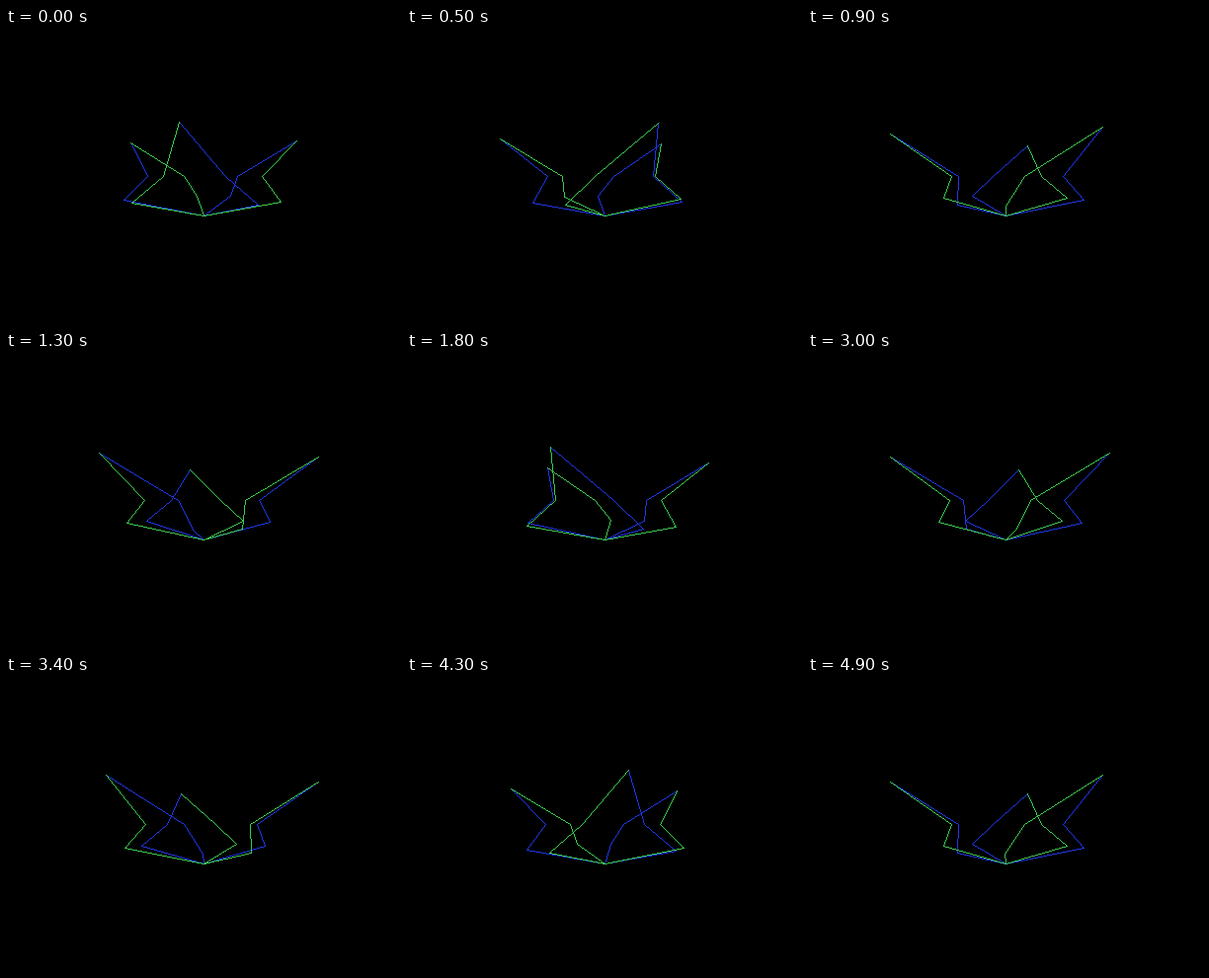
Recreate the animation shown at these times as an HTML page with a canvas. Size 400 px wide and 300 px high, loop 5000 ms.

```html
<!DOCTYPE html>
<html lang="en">
<head>
<meta charset="utf-8">
<title>Rotating wireframe</title>
<style>
  html, body { margin: 0; width: 100%; height: 100%; overflow: hidden; background: #000; }
  canvas { display: block; }
</style>
</head>
<body>
<canvas id="stage" width="400" height="300"></canvas>
<script>
const ctx = document.getElementById('stage').getContext('2d');
const STEP = 100, STEPS = 50;          // ms per step, steps per loop
const TURN = 6, START = -9;            // degrees
const FOCAL = 396.95, DIST = 10, CX = 200, CY = 150.4;

// One petal edge from the base to the tip: radius, height, angle from the tip
const EDGE = [
  [0, -1, 0],
  [2, -0.605, 45],
  [1.474, 0, 28.7],
  [2.8225, 1, 0]
];
const SIDES = [[1, '#2037e6'], [-1, '#3cc850']];

function project(r, h, deg) {
  const a = deg * Math.PI / 180;
  const s = FOCAL / (DIST - r * Math.cos(a));
  return [Math.floor(CX + s * r * Math.sin(a)), Math.floor(CY - s * h)];
}

// Crisp one-pixel line
function line([x0, y0], [x1, y1]) {
  const dx = x1 - x0, dy = y1 - y0;
  const n = Math.max(Math.abs(dx), Math.abs(dy), 1);
  for (let i = 0; i <= n; i++) {
    ctx.fillRect(Math.round(x0 + dx * i / n), Math.round(y0 + dy * i / n), 1, 1);
  }
}

function draw(step) {
  ctx.fillStyle = '#000';
  ctx.fillRect(0, 0, 400, 300);
  for (const [side, color] of SIDES) {
    ctx.fillStyle = color;
    for (let petal = 0; petal < 3; petal++) {
      const tip = START + TURN * step + 120 * petal;
      const pts = EDGE.map(([r, h, off]) => project(r, h, tip + side * off));
      for (let i = 1; i < pts.length; i++) line(pts[i - 1], pts[i]);
    }
  }
}

let shown = -1;
function tick() {
  const step = Math.floor(performance.now() / STEP) % STEPS;
  if (step !== shown) draw(shown = step);
  requestAnimationFrame(tick);
}
tick();
</script>
</body>
</html>
```
